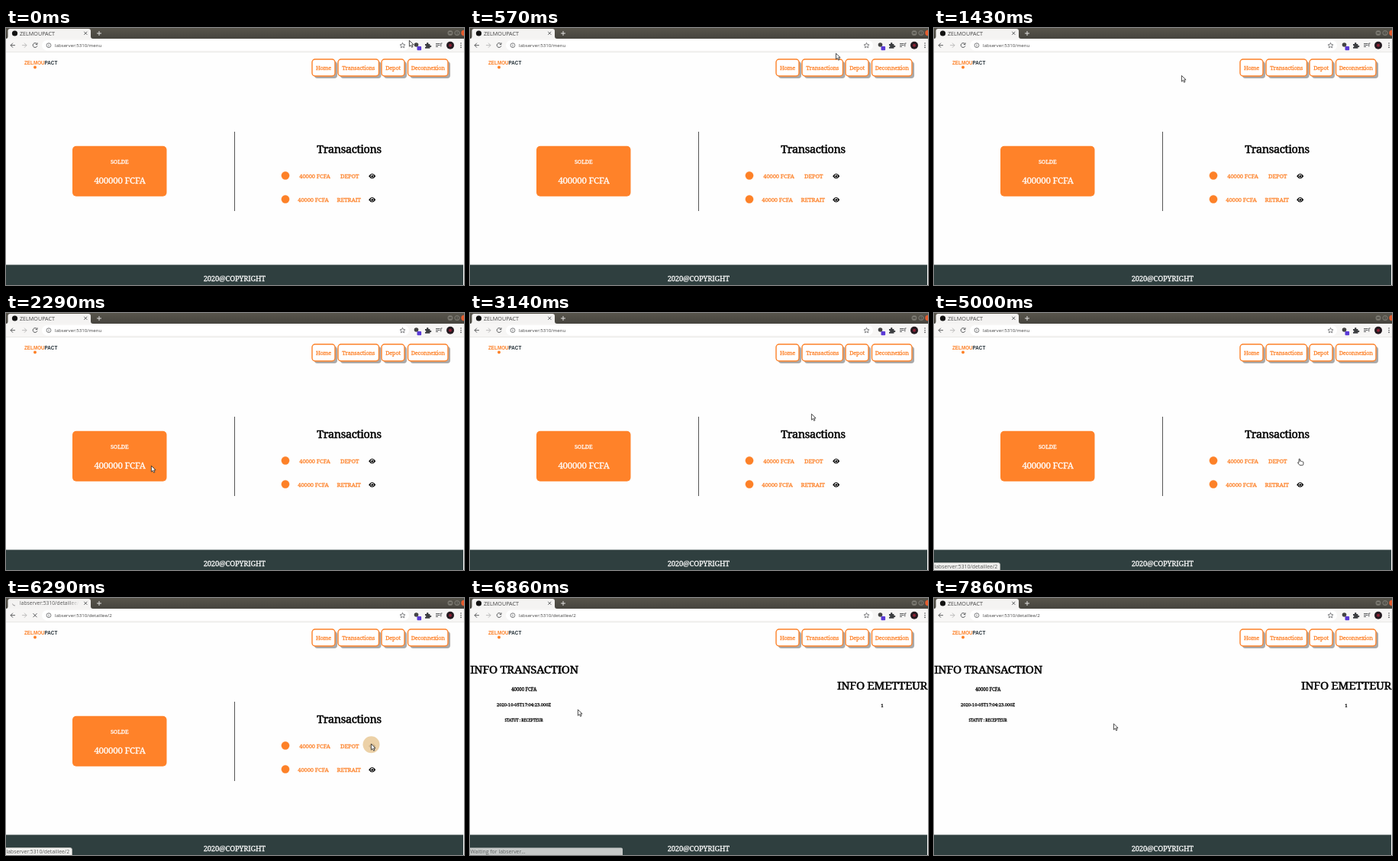
Animation, 600 px wide and 337 px high, one loop 8 s. Source, as an HTML page:

```html
<!DOCTYPE html>
<html lang="fr">
<head>
<meta charset="utf-8">
<title>Transactions</title>
<style>
html, body { margin: 0; width: 100%; height: 100%; overflow: hidden; background: #fefefe; }
svg { display: block; width: 100%; height: 100%; }
text { white-space: pre; }
.serif { font-family: "Noto Serif", serif; text-anchor: middle; stroke-width: .26; }
.serif text, text.serif { letter-spacing: -.02em; }
.title { stroke-width: .5; }
.sans { font-family: "Open Sans", sans-serif; }
.orange { fill: #fd8128; stroke: #fd8128; }
.white { fill: #fff; stroke: #fff; }
.black { fill: #000; stroke: #000; }
.line { fill: none; stroke: #4b4d50; stroke-width: .9; }
</style>
</head>
<body>
<svg viewBox="0 0 600 337">
  <defs>
    <g id="eye">
      <path d="M-4.6 0Q0-6.6 4.6 0Q0 6.6-4.6 0Z"/>
      <circle r="2.2" fill="#fff"/>
      <circle r="1.5"/>
      <circle cx="-.7" cy="-.7" r=".6" fill="#fff"/>
    </g>
    <linearGradient id="fade">
      <stop offset=".8" stop-color="#555"/>
      <stop offset="1" stop-color="#555" stop-opacity="0"/>
    </linearGradient>
    <linearGradient id="bar" x2="0" y2="1">
      <stop stop-color="#58554c"/>
      <stop offset="1" stop-color="#46443e"/>
    </linearGradient>
  </defs>
  <rect width="600" height="337" fill="#fefefe"/>

  <!-- browser -->
  <rect width="600" height="14" fill="url(#bar)"/>
  <path d="M0 14Q2.500 14 2.500 11V4Q2.500 1 5.500 1H108Q111 1 111 4V11Q111 14 114 14Z" fill="#f4f3f2"/>
  <rect y="14" width="600" height="17.500" fill="#f7f6f5"/>
  <path d="M0 31.500H600" stroke="#e2e1df" stroke-width=".7"/>
  <rect x="47" y="16" width="481" height="13.500" rx="6.700" fill="#fff"/>
  <path d="M102.300 4.800l4 4m0-4l-4 4" class="line"/>
  <path d="M119 7h6m-3-3v6" class="line" style="stroke:#eee"/>
  <circle cx="582" cy="6.500" r="3.500" fill="#77756d"/>
  <path d="M580.300 6.500h3.400" stroke="#35342f"/>
  <circle cx="591" cy="6.500" r="3.500" fill="#77756d"/>
  <rect x="589.600" y="5.200" width="2.800" height="2.600" fill="none" stroke="#35342f" stroke-width=".7"/>
  <circle cx="600" cy="6.500" r="3.700" fill="#e65c2e"/>
  <g class="line">
    <path d="M12 22.700H6m3-3l-3 3 3 3"/>
    <path d="M21 22.700h6m-3-3l3 3-3 3" stroke="#b5b5b5"/>
    <circle cx="56" cy="22.700" r="2.900" stroke-width=".7"/>
    <path d="M56 22.300v2m0-3.500v.8" stroke-width=".7"/>
    <path d="M519.500 19.400l1 2.200 2.400.3-1.800 1.600.5 2.400-2.100-1.200-2.100 1.200.5-2.400-1.800-1.600 2.400-.3z" stroke-width=".7"/>
    <path d="M563 20.500h5.500m-5.500 2h5.500m-5.500 2h3m3.800 0v-4.500h1.700"/>
  </g>
  <circle cx="537.500" cy="22" r="2.800" fill="#444"/>
  <rect x="538.500" y="24" width="5.600" height="5.200" rx="1" fill="#5b3bd6"/>
  <path d="M549 21h2q-.4-2 1.200-2t1.200 2h2v2q2-.4 2 1t-2 1.100v1.600H549v-1.700q1.400-.1 1.400-1.100t-1.400-1z" fill="#3c3e41"/>
  <circle cx="582" cy="22.700" r="5" fill="#241a20"/>
  <circle cx="582" cy="22.700" r="2" fill="#8d2033"/>
  <g fill="#4b4d50"><circle cx="596" cy="20" r=".8"/><circle cx="596" cy="22.700" r=".8"/><circle cx="596" cy="25.400" r=".8"/></g>
  <g id="idle">
    <circle cx="11.500" cy="7" r="3.600" fill="#111"/>
    <text x="18" y="9.500" class="sans" font-size="7.200" fill="#444">ZELMOUPACT</text>
    <path d="M40.300 20.700A2.900 2.900 0 1 0 40.900 23.300M41 19.300v2.200h-2.200" class="line"/>
  </g>
  <g id="busy">
    <path id="spin" d="M8.500 7a3 3 0 0 1 3-3" class="line" style="stroke:#999"/>
    <text x="18" y="9.300" class="sans" font-size="6.700" fill="url(#fade)">labserver:5310/detaillee/</text>
    <path d="M35.500 20.200l5 5m0-5l-5 5" class="line"/>
  </g>
  <text id="url" x="64" y="24.900" class="sans" font-size="6.150" fill="#444"></text>

  <!-- header and footer -->
  <text x="24" y="47.800" font-family="Liberation Sans, sans-serif" font-size="6.300" font-weight="bold" fill="#fd8128">ZELMOU<tspan fill="#26323a">PACT</tspan></text>
  <circle cx="38" cy="51.500" r="2" fill="#fd8128"/>
  <g id="nav" class="serif orange" font-size="7.300"></g>
  <rect y="310.500" width="599" height="26.500" fill="#2f3f3f"/>
  <text x="299.300" y="331.500" class="serif white" font-size="9.450">2020@COPYRIGHT</text>

  <!-- dashboard -->
  <g id="home" class="serif">
    <rect x="87" y="154.700" width="123.500" height="66" rx="5" fill="#ff8229"/>
    <g class="white">
      <text x="148.700" y="178" font-size="7.450">SOLDE</text>
      <text x="149" y="203.800" font-size="11.550">400000 FCFA</text>
    </g>
    <path d="M299.500 136V240" stroke="#555" stroke-width="1"/>
    <text x="449.500" y="163.600" class="black title" font-size="14.400">Transactions</text>
    <g class="orange" font-size="7.650">
      <circle cx="366" cy="193.500" r="5.200"/>
      <text x="404.500" y="197">40000 FCFA</text>
      <text x="450.200" y="197">DEPOT</text>
      <circle cx="366" cy="224.500" r="5.200"/>
      <text x="402.500" y="228">40000 FCFA</text>
      <text x="449.200" y="228">RETRAIT</text>
    </g>
    <use id="eye1" href="#eye" x="479.700" y="194.300"/>
    <use href="#eye" x="479.700" y="225.300"/>
  </g>

  <!-- details -->
  <g id="info" class="serif black">
    <g class="title" font-size="15">
      <text x="71" y="99.400">INFO TRANSACTION</text>
      <text x="540" y="119.600">INFO EMETTEUR</text>
    </g>
    <text x="70.700" y="122.400" font-size="6.250">40000 FCFA</text>
    <text x="70.500" y="142.100" font-size="6.100">2020-10-05T17:04:23.000Z</text>
    <text x="70.500" y="161.800" font-size="5.100">STATUT : RECEPTEUR</text>
    <text x="540" y="142.800" font-size="6.100">1</text>
  </g>

  <!-- status bubble -->
  <g id="link" class="sans">
    <path d="M-1 327.500H84Q86.500 327.500 86.500 330V338H-1Z" fill="#f1f1ef" stroke="#b9b9b7" stroke-width=".7"/>
    <text x=".5" y="334.800" font-size="6.800" fill="#555">labserver:5310/detaillee/2</text>
  </g>
  <g id="wait" class="sans">
    <path d="M-1 327.500H198Q200 327.500 200 329.500V338H-1Z" fill="#c6c9c8"/>
    <text x=".5" y="334.800" font-size="6.900" fill="#5f6362">Waiting for labserver…</text>
  </g>

  <!-- pointer -->
  <circle id="ripple" cx="478.500" cy="192.300" fill="#e9cb9b"/>
  <g id="pointer" stroke="#222" stroke-width=".8" stroke-linejoin="round" fill="#fff">
    <path id="arrow" d="M.4.4V8.200L2.300 6.500 3.600 9.300 5 8.600 3.700 5.900H6.100Z"/>
    <path id="hand" d="M2 4.600V1Q2 .3 2.700.3T3.500 1V3.200Q5 2.700 5.300 3.500 6.300 3.100 6.600 3.900 7.900 3.700 7.900 5V7Q7.900 8.700 6.300 8.700H3.300L.6 5.600Q.3 4.300 2 5.200Z"/>
  </g>
</svg>
<script>
const $ = id => document.getElementById(id);
const LOOP = 8000, FPS = 7;
const HOVER = 33, LINK = 35, CLICK = 42, ARROW = 43, LOADED = 47, DONE = 49;

// pointer path: step, x, y
const path = [
  [0, 528, 16], [1, 528, 16], [5, 470, 36], [8, 372, 50], [10, 324, 62],
  [13, 110, 214], [16, 190, 200], [18, 196, 186], [20, 330, 100], [22, 447, 132],
  [24, 522, 198], [25, 516, 200], [28, 207, 170], [30, 330, 94], [32, 469, 203],
  [33, 476, 191], [42, 476, 191], [44, 478, 191], [46, 330, 170], [48, 141, 146],
  [50, 66, 129], [55, 235, 164.5]
];

const nav = [["Home", 401, 30], ["Transactions", 435, 53.5], ["Depot", 492, 30], ["Deconnexion", 526.5, 52.5]];
$("nav").innerHTML = nav.map(([label, x, w]) => `
  <rect x="${x + 3}" y="44" width="${w}" height="22" rx="4" fill="#aaa" stroke="none"/>
  <rect x="${x}" y="41" width="${w}" height="22" rx="4" fill="#fff" stroke-width="1.4"/>
  <text x="${x + w / 2}" y="55.2">${label}</text>`).join("");

const show = (id, on) => $(id).setAttribute("display", on ? "inline" : "none");

function pointerAt(n) {
  const i = Math.max(1, path.findIndex(k => k[0] >= n));
  const [n0, x0, y0] = path[i - 1], [n1, x1, y1] = path[i];
  const p = (n - n0) / (n1 - n0), e = p * p * (3 - 2 * p);
  return [x0 + (x1 - x0) * e, y0 + (y1 - y0) * e];
}

function draw(n) {
  const loading = n >= CLICK && n < LOADED;
  const hand = n >= HOVER && n < ARROW;
  show("idle", !loading);
  show("busy", loading);
  show("home", n < LOADED);
  show("info", n >= LOADED);
  show("link", n >= LINK && n < LOADED);
  show("wait", n >= LOADED && n < DONE);
  show("eye1", !hand);
  show("hand", hand);
  show("arrow", !hand);
  show("ripple", n >= ARROW && n < ARROW + 3);
  $("ripple").setAttribute("r", n === ARROW ? 6 : 11);
  $("ripple").setAttribute("opacity", n === ARROW + 2 ? .45 : .88);
  $("spin").setAttribute("transform", `rotate(${(n - CLICK) * -50} 11.5 7)`);
  $("url").textContent = "labserver:5310/" + (n < CLICK ? "menu" : "detaillee/2");
  $("pointer").setAttribute("transform", `translate(${pointerAt(n)})`);
}

const start = performance.now();
let last = -1;
function tick() {
  const t = (performance.now() - start) % LOOP;
  const n = Math.floor((t + 4.5) * FPS / 1000) % (LOOP * FPS / 1000);
  if (n !== last) draw(last = n);
  requestAnimationFrame(tick);
}
tick();
</script>
</body>
</html>
```
